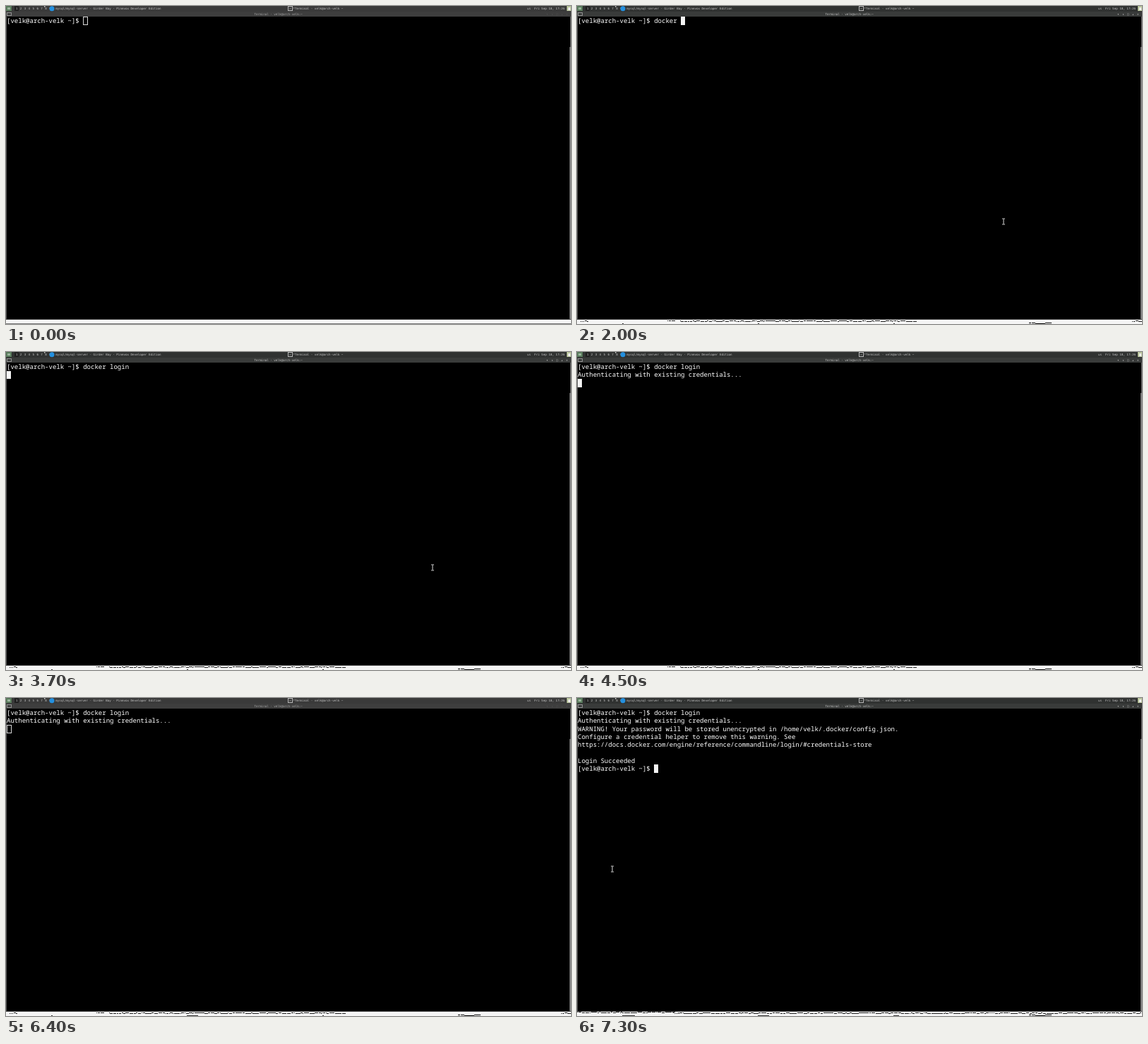
An HTML page with a canvas for the animation above (8 s loop, 800 px wide and 450 px high).

```html
<!DOCTYPE html>
<html lang="en">
<head>
<meta charset="utf-8">
<title>Terminal login</title>
<style>
  html, body { margin: 0; width: 100%; height: 100%; overflow: hidden; background: #000; }
  canvas { display: block; }
</style>
</head>
<body>
<canvas id="stage" width="800" height="450"></canvas>
<script>
const ctx = document.getElementById('stage').getContext('2d');
ctx.textRendering = 'geometricPrecision';

const LOOP = 8000;
const CELL = 13 / 2.4, LINE = 27 / 2.4, LEFT = 1, TOP = 15.4;
const PROMPT = '[velk@arch-velk ~]$ ';
const COMMAND = 'docker login';
const KEY_TIMES = [1100, 1300, 1500, 1600, 1700, 1900, 2000, 2600, 2800, 3000, 3200, 3400];
const ENTER = 3700, AUTH = 4000, RESULT = 7200, DONE = 7300;
const RESULT_LINES = [
  'WARNING! Your password will be stored unencrypted in /home/velk/.docker/config.json.',
  'Configure a credential helper to remove this warning. See',
  'https://docs.docker.com/engine/reference/commandline/login/#credentials-store',
  '',
  'Login Succeeded'
];

function box(x, y, w, h, color) {
  ctx.fillStyle = color;
  ctx.fillRect(x, y, w, h);
}

function outline(x, y, w, h, color) {
  ctx.strokeStyle = color;
  ctx.lineWidth = 1;
  ctx.strokeRect(x + .5, y + .5, w - 1, h - 1);
}

function write(text, x, y, font, color) {
  ctx.save();
  // An invisible skew keeps baselines from snapping to whole pixels.
  ctx.transform(1, 1e-5, 0, 1, 0, 0);
  ctx.font = font;
  ctx.fillStyle = color;
  ctx.fillText(text, x, y);
  ctx.restore();
}

function label(text, x, y, color = '#c8c8c8') {
  write(text, x, y, '4.22px "DejaVu Sans Mono", monospace', color);
}

function drawPanel(focused) {
  box(0, 0, 800, 8, focused ? '#303231' : '#3a3a3a');
  box(0, 8, 800, 7, focused ? '#393b3a' : '#3e3e3e');
  box(0, 0, 8, 7, '#587a5b');
  box(2, 2, 4, 3, '#9ab49c');
  box(12, 0, 6, 7, '#202020');
  for (let n = 1; n <= 9; n++) label(n, 8 + n * 5.9, 5.2);
  box(54, 0, 1.5, 1.5, '#ccc');

  ctx.fillStyle = '#2490df';
  ctx.beginPath();
  ctx.arc(65, 3.7, 3.5, 0, 7);
  ctx.fill();
  label('mysql/mysql-server - Girder Bay - Pinevox Developer Edition', 70.3, 5.2);
  outline(399, 0, 7, 7, '#b8b8b8');
  label('>', 401, 5.2);
  label('*Terminal - velk@arch-velk ~', 406.5, 5.2);
  label('us', 738, 5.2);
  label('Fri Sep 18, 17:26', 748, 5.2);
  box(794, 0, 6, 7, '#b9c59c');
  box(796, 2, 3, 4, '#eee');

  outline(1, 9, 7, 5, '#929292');
  label('Terminal - velk@arch-velk:~', 351.5, 13.2, focused ? '#c8c8c8' : '#aaa');
  [...'▾◂□▴×'].forEach((sign, i) => label(sign, 765 + i * 7, 13.2, focused ? '#d0d0d0' : '#555'));
}

function dashes(from, to, y, color = '#222') {
  let seed = from + 17;
  const random = () => (seed = seed * 16807 % 2147483647) / 2147483647;
  for (let x = from; x < to;) {
    const w = 1 + Math.floor(random() * 5);
    box(x, y + Math.floor(random() * 2), w, 1, color);
    x += w + Math.floor(random() * 2);
  }
}

function drawEdges(t) {
  box(0, 15, 1, 429, '#555');
  box(799, 15, 1, 429, '#777');
  box(798, 58, 1, 386, '#8a8a8a');
  box(0, 443, 800, 1, '#444');
  box(0, 444, 800, 6, '#f5f5f5');
  if (t < 100) {
    box(0, 449, 800, 1, '#777');
    return;
  }
  if (t < RESULT) {
    dashes(5, 15, 445);
    dashes(128, 135, 445);
    dashes(146, 482, 445);
    dashes(786, 800, 445);
  } else {
    dashes(0, 136, 444);
    dashes(136, 800, 445);
  }
  box(64, 449, t < RESULT ? 2 : 18, 1, '#333');
  box(256, 449, t < 6200 ? 2 : 16, 1, '#333');
  box(448, 449, t < RESULT ? 2 : 8, 1, '#333');
  dashes(640, 670, 448, '#000');
}

function drawCursor(column, row, focused) {
  const x = LEFT + column * CELL, y = TOP + row * LINE;
  const left = Math.floor(x), top = Math.round(y);
  if (focused) box(left, top, Math.ceil(x + CELL) - left, Math.ceil(y + LINE) - top, '#f4f4f4');
  else outline(left, top, 7, 12, '#d8d8d8');
}

function drawTerminal(t, focused) {
  const typed = COMMAND.slice(0, KEY_TIMES.filter(key => t >= key).length);
  const lines = [PROMPT + typed];
  if (t >= AUTH) lines.push('Authenticating with existing credentials...');
  if (t >= RESULT) lines.push(...RESULT_LINES);
  if (t >= DONE) lines.push(PROMPT);
  else if (t >= ENTER) lines.push('');

  const font = `${CELL / .6}px "Noto Sans Mono", monospace`;
  lines.forEach((line, row) => write(line, LEFT, TOP + 8.75 + row * LINE, font, '#fff'));
  const last = lines.length - 1;
  drawCursor(lines[last].length, last, focused);
}

function pointerAt(t) {
  const step = Math.floor(t / 100) * 100;
  const glide = (start, end, x0, y0, x1, y1) => {
    const p = Math.min(1, (step - start) / (end - start));
    const ease = 1 - (1 - p) ** 2;
    return [Math.round(x0 + (x1 - x0) * ease), Math.round(y0 + (y1 - y0) * ease)];
  };
  if (t >= 100 && t < 4500) return glide(100, 600, 4, 250, 604, 305);
  if (t >= 6200 && t < 6400) return glide(6100, 6400, 604, 305, 0, 250);
  if (t >= 6500) return glide(6500, 7000, 3, 236, 50, 242);
  return null;
}

function drawPointer([x, y]) {
  box(x - 2, y - 4.5, 4, 1, '#ccc');
  box(x - 2, y + 3.5, 4, 1, '#ccc');
  box(x - .5, y - 3.5, 1, 7, '#ddd');
}

function draw(t) {
  const focused = t >= 100 && !(t >= 6400 && t < 6500);
  box(0, 0, 800, 450, '#000');
  drawPanel(focused);
  drawEdges(t);
  drawTerminal(t, focused);
  const pointer = pointerAt(t);
  if (pointer) drawPointer(pointer);
}

const start = performance.now();
function tick() {
  draw((performance.now() - start) % LOOP);
  requestAnimationFrame(tick);
}
tick();
</script>
</body>
</html>
```
